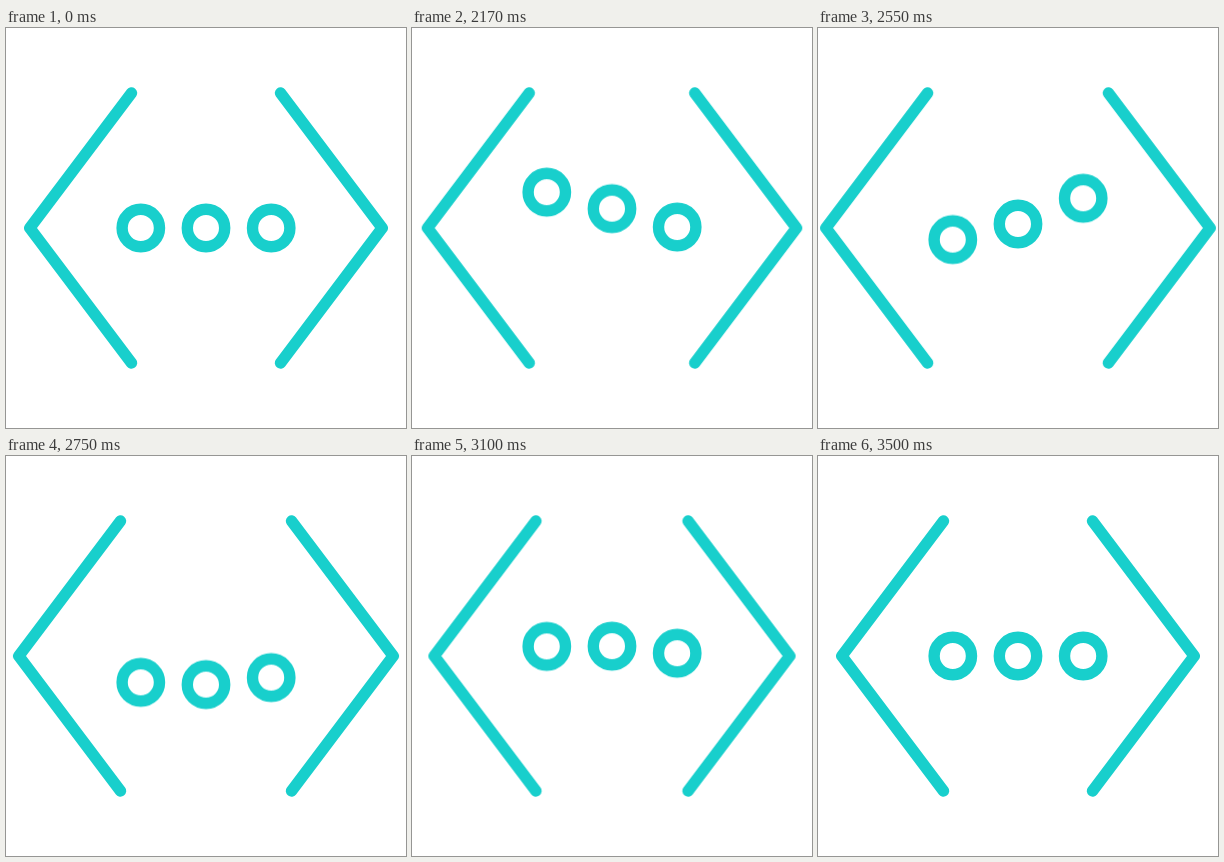
Animation, 400 px wide and 400 px high, one loop 3.52 s. Source, as an HTML page without scripts:

```html
<!DOCTYPE html>
<html lang="en">
<head>
<meta charset="utf-8">
<title>Code brackets with bouncing dots</title>
<style>
  html, body { margin: 0; width: 100%; height: 100%; overflow: hidden; background: #fff; }
  svg {
    display: block; width: 100%; height: 100%;
    fill: none; stroke: #18cfcc; stroke-width: 11.4;
    stroke-linecap: round; stroke-linejoin: round;
  }
  .bracket { animation: spread 3520ms infinite; }
  .dot { animation: bounce 3520ms cubic-bezier(.4, 0, .6, 1) infinite; }
  .second { animation-delay: 58ms; }
  .third { animation-delay: 150ms; }

  @keyframes spread {
    0%, 56.82% { transform: translateX(0); animation-timing-function: cubic-bezier(.33, 0, .4, 1); }
    69.03%, 69.6% { transform: translateX(-16.6px); animation-timing-function: cubic-bezier(.33, 0, .55, 1); }
    93.75%, 100% { transform: translateX(0); }
  }
  @keyframes bounce {
    0%, 56.68% { transform: translateY(0); }
    64.2% { transform: translateY(-47.3px); }
    76.42% { transform: translateY(28.6px); }
    86.93% { transform: translateY(-10px); }
    95.17%, 100% { transform: translateY(0); }
  }
</style>
</head>
<body>
<svg viewBox="0 0 400 400">
  <defs>
    <path id="angle" d="M125.5 65 L23.8 200 L125.5 335"/>
  </defs>
  <use class="bracket" href="#angle"/>
  <g transform="matrix(-1 0 0 1 400 0)"><use class="bracket" href="#angle"/></g>
  <circle class="dot" cx="134.8" cy="200" r="18.7"/>
  <circle class="dot second" cx="200" cy="200" r="18.7"/>
  <circle class="dot third" cx="265.2" cy="200" r="18.7"/>
</svg>
</body>
</html>
```
